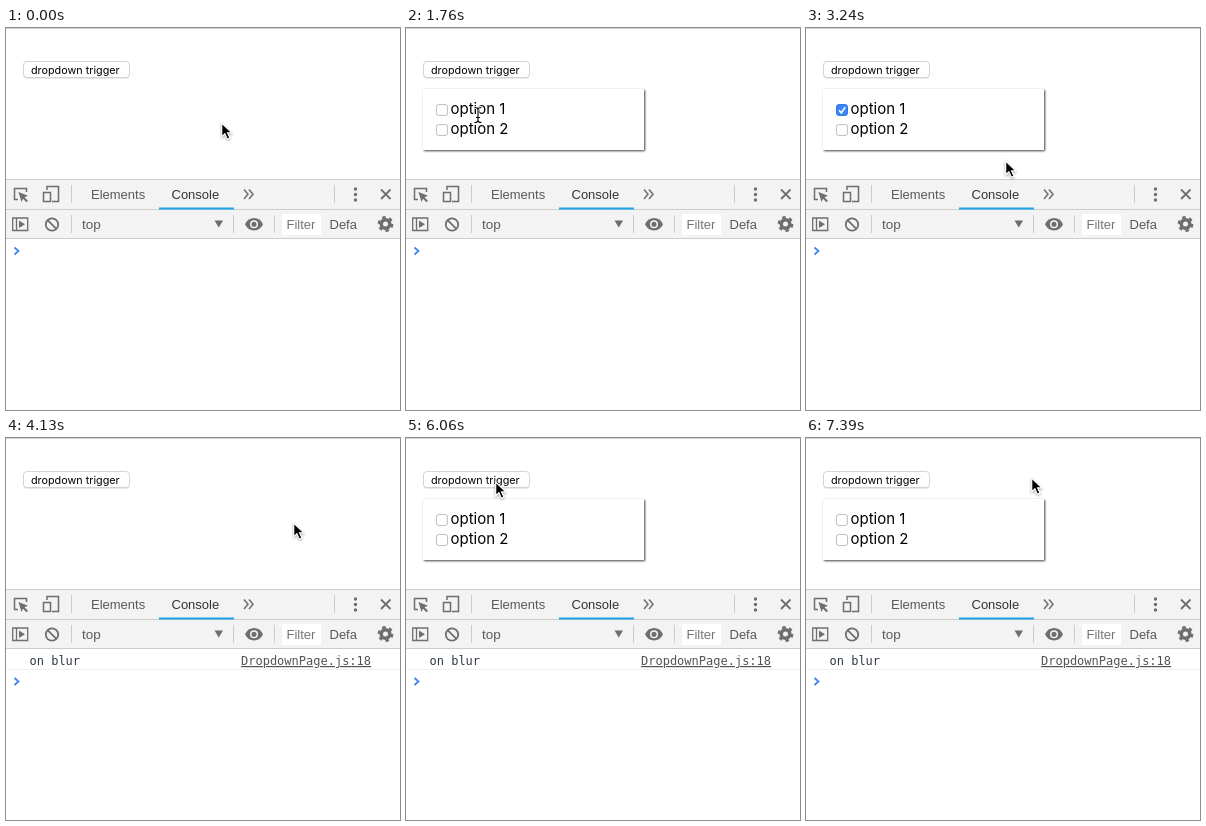
An HTML page that plays this animation: 394 px wide and 382 px high, repeating every 8 s.

```html
<!DOCTYPE html>
<html lang="en">
<head>
<meta charset="utf-8">
<style>
html, body { margin: 0; width: 100%; height: 100%; overflow: hidden; background: #fff; }
svg { display: block; width: 394px; height: 382px; }
text { white-space: pre; }
.page { font-family: Inter, Roboto, sans-serif; }
.tools { font: 13px "Liberation Sans", Arial, sans-serif; fill: #5a5a5a; }
.mono { font: 12px "DejaVu Sans Mono", Menlo, monospace; fill: #303942; }
.icon { fill: none; stroke: #6e6e6e; stroke-width: 1.5; }
.solid { fill: #6e6e6e; }
#panel { filter: drop-shadow(1px 1px 1px rgba(0, 0, 0, .75)); }
</style>
</head>
<body>
<svg viewBox="0 0 394 382">
  <defs>
    <linearGradient id="blue" x2="0" y2="1">
      <stop stop-color="#4b98fb"/><stop offset="1" stop-color="#0a5be0"/>
    </linearGradient>
  </defs>
  <path d="M0 .5H394" stroke="#d2d2d2"/>

  <!-- page -->
  <g class="page">
    <rect x="17.5" y="34" width="106" height="16.5" rx="3.5" fill="#b9b9b9" opacity=".6"/>
    <rect id="button" x="17.5" y="33.5" width="106" height="16" rx="3.5"/>
    <text x="25" y="46" font-size="10.8">dropdown trigger</text>
    <g id="menu">
      <rect id="panel" x="17" y="61" width="221" height="61" fill="#fff"/>
      <g fill="#fff" stroke="#c0c0c0">
        <rect id="box" x="30.5" y="76.5" width="11" height="11" rx="2.5"/>
        <rect x="30.5" y="96.5" width="11" height="11" rx="2.5"/>
      </g>
      <path id="tick" d="M33 82.3l2.3 2.6 4-5.8" fill="none" stroke="#fff" stroke-width="1.6"/>
      <g font-size="15">
        <text x="44.5" y="86">option 1</text>
        <text x="44.5" y="106">option 2</text>
      </g>
    </g>
  </g>

  <!-- toolbars -->
  <rect y="151" width="394" height="60" fill="#f3f3f3"/>
  <path d="M0 151.5H394M0 181.5H394M0 210.5H394M65.5 157v18M328.5 157v18M65.5 187v18M227.5 187v18M268.5 187v18" stroke="#ccc"/>
  <path d="M153 180.5h75" stroke="#1ba5e8" stroke-width="2"/>
  <g class="tools">
    <text x="85" y="171">Elements</text>
    <text x="165.500" y="171" fill="#333">Console</text>
    <text x="76" y="201" font-size="13.5">top</text>
    <rect x="276" y="186" width="39" height="21" fill="#fff"/>
    <text x="280.500" y="201" fill="#757575">Filter</text>
    <svg x="322" y="186" width="29" height="22"><text x="1.500" y="15">Defa</text></svg>
  </g>
  <g class="icon">
    <path d="M12 171.500H8.500V160.500H20.500V164"/>
    <path d="M41 162V158.500H52.500V173.500H46M37.500 164.500h7v9h-7z"/>
    <path d="M238 161.500l4 4.700-4 4.700M243 161.500l4 4.700-4 4.700"/>
    <path d="M375 161.500l9.500 9.500M384.500 161.500l-9.500 9.500" stroke-width="1.800"/>
    <path d="M6.700 190h15v12.500h-15zM10.500 190v12.500" stroke-width="1.300"/>
    <circle cx="46" cy="196.500" r="6.200" stroke-width="1.800"/>
    <path d="M41.600 192.100l8.800 8.800" stroke-width="1.800"/>
    <circle cx="379.500" cy="196" r="4.300" stroke-width="3.600"/>
    <circle cx="379.500" cy="196" r="6.700" stroke-width="2.400" stroke-dasharray="3.500 3.516"/>
  </g>
  <g class="solid">
    <path d="M12.500 164l9.500 3.700-3.500 1.500 3.500 3.500-1.500 1.500-3.500-3.500-1.500 3.300z"/>
    <circle cx="349.500" cy="161" r="1.700"/><circle cx="349.500" cy="166.500" r="1.700"/><circle cx="349.500" cy="172" r="1.700"/>
    <path d="M13 192.500l6 3.800-6 3.800zM208.500 192.500h8.500l-4.250 7z"/>
    <path d="M239 196.300Q242 190 248 190T257 196.300Q254 202.500 248 202.500T239 196.300z"/>
    <circle cx="248" cy="196.300" r="3.300" fill="none" stroke="#f3f3f3" stroke-width="1.500"/>
  </g>

  <!-- console -->
  <g id="log" class="mono">
    <text x="23.500" y="227">on blur</text>
    <text x="235" y="227" fill="#545454" text-decoration="underline">DropdownPage.js:18</text>
    <path d="M0 231.500H394" stroke="#f0f0f0"/>
  </g>
  <path id="prompt" d="M8.500 219.500l4 3.500-4 3.500" fill="none" stroke="#3f80ee" stroke-width="1.700"/>

  <!-- pointers -->
  <path id="arrow" d="M.7 1V14.800L3.900 11.800 6.300 17.200 8.900 16.100 6.600 10.900H10.800Z" stroke="#fff" stroke-width="1.200" style="filter:drop-shadow(0 1px 1px rgba(0,0,0,.35))"/>
  <g id="beam" fill="none">
    <path id="stem" d="M-3.500-7.500Q0-7.500 0-5.500Q0-7.500 3.500-7.500M0-5.500V5.500M-3.500 7.500Q0 7.500 0 5.500Q0 7.500 3.500 7.500M-2 2.500H2" stroke="#fff" stroke-width="2.400"/>
    <use href="#stem" style="stroke:#000"/>
    <path d="M-3.500-7.500Q0-7.500 0-5.500Q0-7.500 3.500-7.500M0-5.500V5.500M-3.500 7.500Q0 7.500 0 5.500Q0 7.500 3.500 7.500M-2 2.500H2" stroke="#000" stroke-width="1.100"/>
  </g>
</svg>
<script>
const LOOP = 8000;
const $ = id => document.getElementById(id);
const show = (id, on) => $(id).style.display = on ? '' : 'none';
const set = (id, name, value) => $(id).setAttribute(name, value);

// Pointer moves: first step, last step (ms), step count, x, y, ease-out power
const moves = [
  [300, 890, 5, 91, 39, 1.5],
  [1320, 1320, 1, 89, 43, 1],
  [1470, 1760, 3, 72, 87, 1],
  [1910, 2200, 3, 34, 83, 1.4],
  [2950, 3240, 3, 199, 132, 1],
  [3390, 3680, 3, 287, 84, 1.4],
  [5320, 5760, 4, 89, 43, 1.5],
  [6500, 6650, 2, 75, 81, 1],
  [6800, 7390, 5, 225, 39, 1.4]
];

function pointer(t) {
  let x = 215, y = 94;
  for (const [start, end, steps, toX, toY, power] of moves) {
    if (t < start) break;
    const gap = (end - start) / (steps - 1) || 1;
    const step = Math.min(steps, Math.floor((t - start) / gap + 0.05) + 1);
    const k = 1 - (1 - step / steps) ** power;
    x += (toX - x) * k;
    y += (toY - y) * k;
  }
  return [Math.round(x), Math.round(y)];
}

function draw(t) {
  const within = (a, b) => t >= a && t < b;
  const open = within(1180, 4130) || t >= 6060;
  const pressed = within(1030, 1180) || within(5910, 6060);
  const checked = within(2650, 4130);
  const logged = t >= 4130;

  set('button', 'fill', pressed ? 'url(#blue)' : '#fff');
  set('button', 'stroke', pressed ? '#2a6fd8' : '#d4d4d4');
  show('menu', open);
  set('box', 'fill', checked ? '#3b86f7' : within(2500, 2650) ? '#e2e2e2' : '#fff');
  set('box', 'stroke', checked ? '#2f78ea' : '#c0c0c0');
  show('tick', checked);
  show('log', logged);
  set('prompt', 'transform', `translate(0 ${logged ? 20.5 : 0})`);

  const [x, y] = pointer(t);
  const overText = open && x > 43 && x < 104 && y > 71 && y < 111;
  show('arrow', !overText);
  show('beam', overText);
  set(overText ? 'beam' : 'arrow', 'transform', `translate(${x} ${y})`);
}

function tick(now) {
  draw(now % LOOP);
  requestAnimationFrame(tick);
}
draw(0);
requestAnimationFrame(tick);
</script>
</body>
</html>
```
